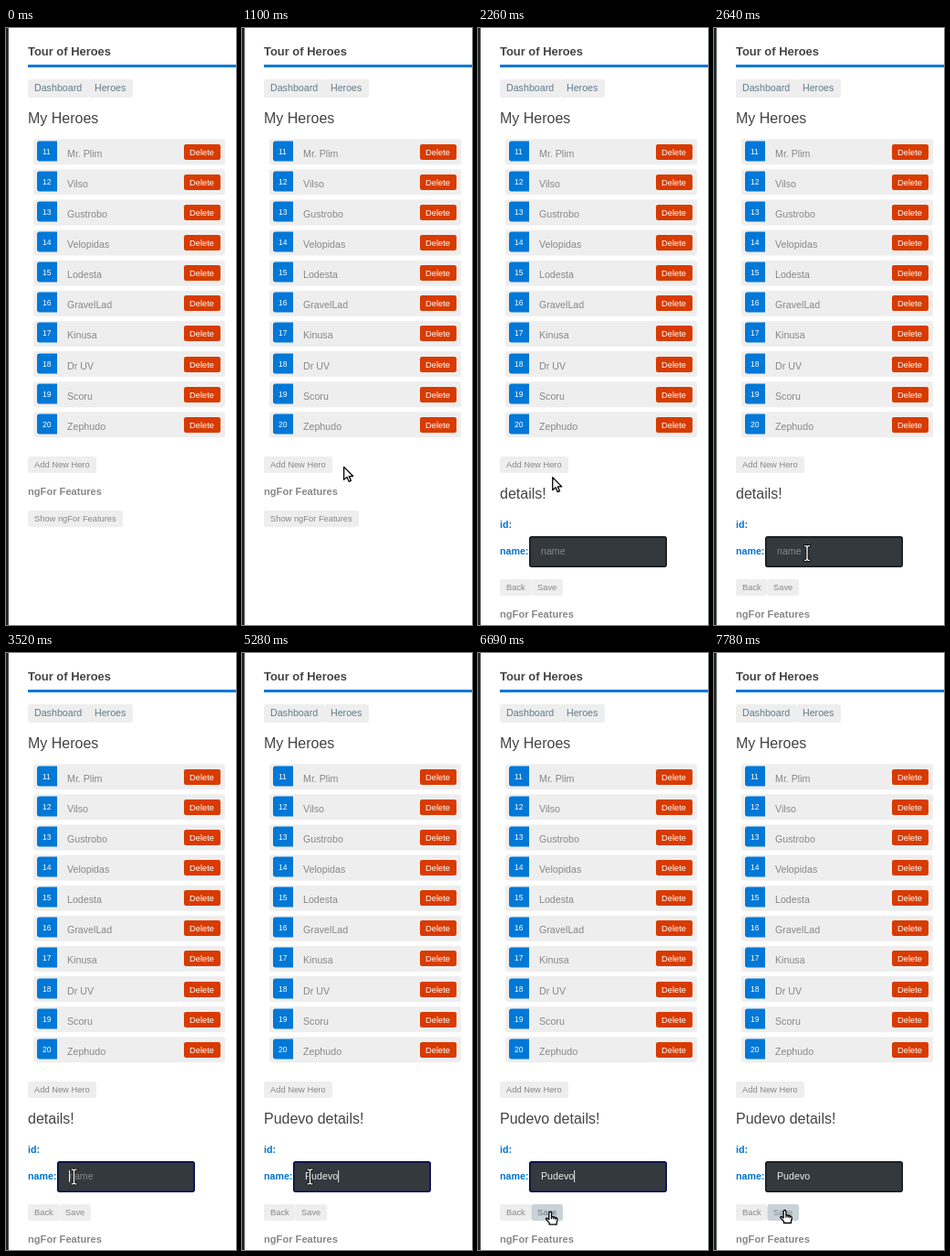
Write an HTML page that moves like this. It is 252x652 px and loops after 8000 ms.

```html
<!DOCTYPE html>
<html lang="en">
<head>
<meta charset="utf-8">
<title>Tour of Heroes</title>
<style>
html, body { margin: 0; width: 100%; height: 100%; overflow: hidden; background: #fff; }
svg { display: block; width: 252px; height: 652px; }
text { font: 10.67px "Liberation Sans", Arial, sans-serif; fill: #888; white-space: pre; }
.title { font-size: 12.93px; font-weight: bold; fill: #444; }
.head { font-size: 16px; fill: #444; }
.sub { font-size: 11.13px; font-weight: bold; }
.nav { fill: #607d8b; }
.label { font-weight: bold; fill: #0073cf; }
.badge { font-size: 8.53px; fill: #fff; }
.btn text { font-size: 9.33px; }
.btn rect, .box { fill: #eee; }
.btn.hover rect { fill: #c9d2d7; }
.btn.hover text { fill: #6e767a; }
.btn.down text { fill: #83898c; }
.btn.del rect { fill: #d83b01; }
.btn.del text { fill: #fff; }
.blue { fill: #0078d7; }
.field { fill: #33393c; stroke: #121415; stroke-width: 1.4; }
.field.focus { stroke: #000058; }
#value { fill: #eee; }
#value.empty { fill: #85898b; }
.cursor path { fill: #fff; stroke: #000; stroke-width: 1.3; stroke-linejoin: round; }
.cursor #beam { stroke-width: 1.6; paint-order: stroke; }
</style>
</head>
<body>
<svg viewBox="0 0 252 652">
  <rect width="2" height="652" fill="#1f2425"/>
  <rect x="2" width="1" height="652" fill="#4b5051"/>
  <text class="title" x="24" y="30">Tour of Heroes</text>
  <rect class="blue" x="24" y="40" width="228" height="3"/>
  <rect class="box" x="24" y="56" width="67" height="20" rx="2.7"/>
  <rect class="box" x="90.5" y="56" width="48.5" height="20" rx="2.7"/>
  <text class="nav" x="31" y="69">Dashboard</text>
  <text class="nav" x="97" y="69">Heroes</text>
  <text class="head" x="24" y="104">My Heroes</text>
  <g id="list"></g>
  <g id="add" class="btn">
    <rect x="24" y="468" width="75" height="18" rx="2.5"/>
    <text x="31" y="480.3">Add New Hero</text>
  </g>
  <g id="features">
    <text class="sub" x="24" y="510">ngFor Features</text>
    <g class="btn">
      <rect x="24" y="527" width="104" height="18" rx="2.5"/>
      <text x="31" y="539.3">Show ngFor Features</text>
    </g>
  </g>
  <g id="details">
    <text id="heading" class="head" x="24" y="514"></text>
    <text class="label" x="24" y="546">id:</text>
    <text class="label" x="24" y="575">name:</text>
    <rect id="field" class="field" x="56.7" y="555.7" width="149.6" height="32.6" rx="2"/>
    <text id="value" x="69" y="575"></text>
    <rect id="caret" y="565" width="1" height="13" fill="#eee"/>
    <g class="btn">
      <rect x="24" y="602" width="34.5" height="18" rx="2.5"/>
      <text x="31" y="614.3">Back</text>
    </g>
    <g id="save" class="btn">
      <rect x="58.5" y="602" width="34.5" height="18" rx="2.5"/>
      <text x="65" y="614.3">Save</text>
    </g>
  </g>
  <g id="cursor" class="cursor">
    <path id="arrow" d="M0 0V14L3.3 11L5.5 16L7.8 15L5.6 10.2H10Z"/>
    <path id="hand" d="M-1.4 1Q0-1 1.4 1V5.2L3 5.5L5 6L7 6.8Q8 7.4 7.8 9L7 12V14H-1V12.2L-4.6 8.4Q-5 6.8-3.4 7L-1.4 8.6ZM1.4 5V8M3.6 5.7V8M5.6 6.3V8.5"/>
    <path id="beam" d="M-3-8.5H-.9L0-7.8L.9-8.5H3V-7.3H1.3L.7-6.6V6.6L1.3 7.3H3V8.5H.9L0 7.8L-.9 8.5H-3V7.3H-1.3L-.7 6.6V-6.6L-1.3-7.3H-3Z"/>
  </g>
</svg>
<script>
const LOOP = 8000;
const NAME = 'Pudevo';
const KEYS = [4480, 4720, 4826, 4933, 5040, 5280];
const OPEN = 1790, FOCUS = 2830, PRESS = 1740, SAVE = 7780;
const ROW_TOP = 121.2, ROW_PITCH = 33.12;
const HEROES = ['Mr. Plim', 'Vilso', 'Gustrobo', 'Velopidas', 'Lodesta',
  'GravelLad', 'Kinusa', 'Dr UV', 'Scoru', 'Zephudo'];

// Pointer moves: start, end, number of steps, path
const MOVES = [
  [500, 790, 8, [[258, 540], [117, 479]]],
  [1100, 1360, 7, [[117, 479], [79.5, 481.5]]],
  [2260, 2640, 10, [[79.5, 481.5], [102, 573.5]]],
  [3100, 3520, 11, [[102, 573.5], [84, 572], [67, 571.5], [74.5, 572]]],
  [5860, 6640, 18, [[74.5, 572], [98, 575], [111, 583], [111, 600], [80, 611]]],
  [6690, 6770, 3, [[80, 611], [77.5, 608.5]]]
];

const $ = id => document.getElementById(id);
const show = (id, on) => $(id).setAttribute('display', on ? 'inline' : 'none');

// Row contents sit on whole pixels, their backgrounds do not
$('list').innerHTML = HEROES.map((name, i) => {
  const y = ROW_TOP + i * ROW_PITCH;
  return `
  <rect class="box" x="30" y="${y.toFixed(2)}" width="210" height="28" rx="2.7"/>
  <g transform="translate(0 ${Math.floor(y)})">
    <path class="blue" d="M56 2.5V24.5H36.7Q34 24.5 34 21.8V5.2Q34 2.5 36.7 2.5Z"/>
    <text class="badge" x="40" y="17">${11 + i}</text>
    <text x="67" y="20">${name}</text>
    <g class="btn del">
      <rect x="195" y="6" width="40" height="17" rx="2.2"/>
      <text x="201" y="17.6">Delete</text>
    </g>
  </g>`;
}).join('');

function along(path, u) {
  const s = u * (path.length - 1);
  const i = Math.min(Math.floor(s), path.length - 2);
  return path[i].map((v, k) => v + (path[i + 1][k] - v) * (s - i));
}

function pointer(t) {
  const move = MOVES.filter(m => m[0] <= t).pop();
  if (!move) return [300, 560];
  const [from, to, steps, path] = move;
  const step = Math.floor((t - from) / (to - from) * (steps - 1) + 1e-6) + 1;
  return along(path, Math.min(1, step / steps));
}

const inside = ([x, y], l, t, r, b) => x >= l && x < r && y >= t && y < b;

function render(t) {
  const open = t >= OPEN;
  const focus = t >= FOCUS && t < SAVE;
  const typed = NAME.slice(0, KEYS.filter(k => k <= t).length);

  show('details', open);
  $('features').setAttribute('transform', `translate(0 ${open ? 134 : 0})`);
  $('heading').textContent = `${typed} details!`.trim();
  $('value').textContent = typed || 'name';
  $('value').classList.toggle('empty', !typed);
  $('field').classList.toggle('focus', focus);
  show('caret', focus);
  if (focus) $('caret').setAttribute('x', 69 + (typed ? $('value').getComputedTextLength() : 0));

  const p = pointer(t);
  const onAdd = inside(p, 24, 468, 99, 486);
  const onSave = open && inside(p, 58, 602, 93, 620);
  const onField = open && inside(p, 56, 555, 207, 589);
  $('add').classList.toggle('hover', onAdd);
  $('add').classList.toggle('down', onAdd && t >= PRESS);
  $('save').classList.toggle('hover', onSave);
  $('save').classList.toggle('down', onSave && t >= SAVE);
  $('cursor').setAttribute('transform', `translate(${p})`);
  show('hand', onAdd || onSave);
  show('beam', onField);
  show('arrow', !onAdd && !onSave && !onField);
}

let start;
function tick(now) {
  start ??= now;
  render((now - start) % LOOP);
  requestAnimationFrame(tick);
}
render(0);
requestAnimationFrame(tick);
</script>
</body>
</html>
```
